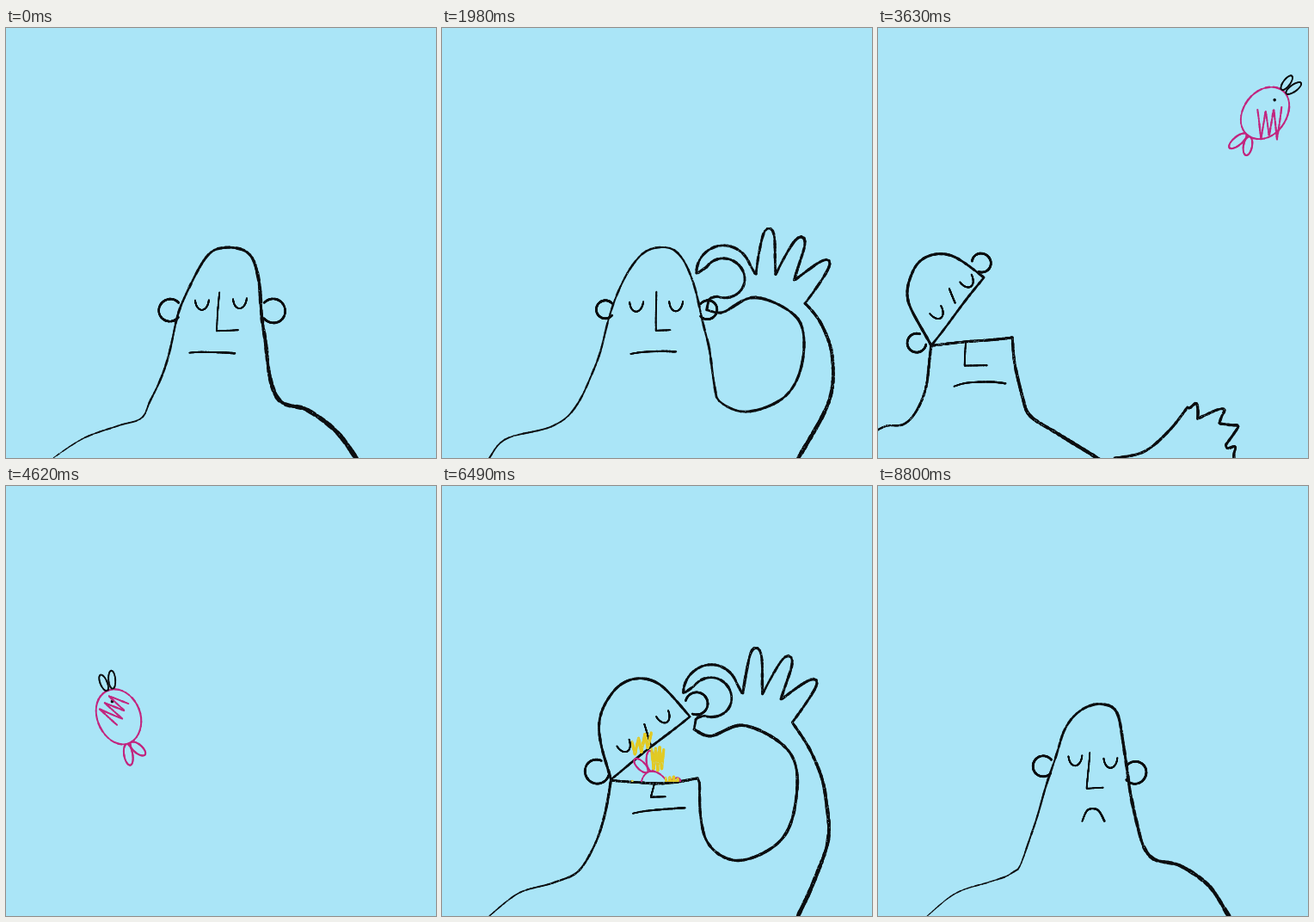
Write an HTML page with a canvas that moves like this. It is 500 px wide and 500 px high and loops after 8.91 s.

```html
<!DOCTYPE html>
<html lang="en">
<head>
<meta charset="utf-8">
<title>Bird in the head</title>
<style>
html, body { margin: 0; width: 100%; height: 100%; overflow: hidden; background: #aae5f7; }
canvas { display: block; width: 100vw; height: 100vh; }
</style>
</head>
<body>
<canvas id="stage" width="500" height="500"></canvas>
<script>
const ctx = document.getElementById('stage').getContext('2d');
const SKY = '#aae5f7', INK = '#0c0e10', PINK = '#c2267f', GOLD = '#e2ca24';
const STEP = 110, COUNT = 81, N = 150, RAD = Math.PI / 180;

const mix = (a, b, t) => a + (b - a) * t;
const ease = t => t * t * (3 - 2 * t);
const rnd = (i, seed) => { const v = Math.sin(i * 12.9898 + seed * 78.233) * 43758.5453; return v - Math.floor(v); };

// Geometry: every helper returns a list of [x, y]
const pairs = v => Array.from({ length: v.length / 2 }, (_, i) => [v[2 * i], v[2 * i + 1]]);
function spline(...v) {
  const p = pairs(v), out = [];
  for (let i = 0; i < p.length - 1; i++) {
    const a = p[Math.max(i - 1, 0)], b = p[i], c = p[i + 1], d = p[Math.min(i + 2, p.length - 1)];
    for (let t = 0; t < 1; t += .05)
      out.push([0, 1].map(k => b[k] + .5 * t * (c[k] - a[k] + t * (2 * a[k] - 5 * b[k] + 4 * c[k] - d[k] + t * (3 * (b[k] - c[k]) + d[k] - a[k])))));
  }
  return [...out, p[p.length - 1]];
}
// Elliptic arc in degrees, tilted about its centre
function arc(x, y, rx, ry, from, to, tilt = 0) {
  const n = Math.ceil(Math.abs(to - from) / 9), c = Math.cos(tilt * RAD), s = Math.sin(tilt * RAD);
  return Array.from({ length: n + 1 }, (_, i) => {
    const a = mix(from, to, i / n) * RAD, u = rx * Math.cos(a), v = ry * Math.sin(a);
    return [x + u * c - v * s, y + u * s + v * c];
  });
}
function leaf(x, y, length, angle, fat) {
  const r = length / 2;
  return arc(x + r * Math.cos(angle * RAD), y + r * Math.sin(angle * RAD), r, fat, -170, 170, angle);
}
// Evenly spaced points, so that any two strokes can be blended
function even(p, n = N) {
  const at = [0];
  for (let i = 1; i < p.length; i++) at.push(at[i - 1] + Math.hypot(p[i][0] - p[i - 1][0], p[i][1] - p[i - 1][1]));
  let k = 1;
  return Array.from({ length: n }, (_, i) => {
    const d = at[at.length - 1] * i / (n - 1);
    while (k < p.length - 1 && at[k] < d) k++;
    const t = (d - at[k - 1]) / (at[k] - at[k - 1] || 1);
    return [mix(p[k - 1][0], p[k][0], t), mix(p[k - 1][1], p[k][1], t)];
  });
}
const blend = (p, q, t) => p.map(([x, y], i) => [mix(x, q[i][0], t), mix(y, q[i][1], t)]);

// Face parts
const eye = ([x, y], tilt) => arc(x, y, 8, 13, 172, 6, tilt);
const ear = ([x, y, r], facing) => arc(x, y, r, r, -140, 140, facing);
const nose = ([x0, y0, x1, y1, tip]) => tip ? [[x0, y0], [x1, y1], [x1 + tip, y1 - 1]] : [[x0, y0], [x1, y1]];
const mouth = ([x0, y0, x1, y1, bend]) => spline(x0, y0, mix(x0, x1, .25), mix(y0, y1, .25) - bend, mix(x0, x1, .7), mix(y0, y1, .7) - bend, x1, y1);
const face = (tilt, ears, eyes, n, m) => ({
  earL: ear(ears[0], 180 + tilt), earR: ear(ears[1], tilt),
  eyeL: eye(eyes[0], tilt), eyeR: eye(eyes[1], tilt), nose: nose(n), mouth: mouth(m)
});
// Skull cap on the chord from hinge to tip
function dome(x0, y0, x1, y1, high) {
  const dx = x1 - x0, dy = y1 - y0, shape = [0, 0, .24, .49, .55, .66, .8, .63, .97, .42, 1, 0];
  const v = pairs(shape).flatMap(([u, h]) => [x0 + dx * u + dy * h * high, y0 + dy * u - dx * h * high]);
  return [...spline(...v), [x0, y0]];
}
// Fingers: tips between valleys
function fingers(valleys, tips, fat) {
  return tips.flatMap(([x, y], i) => {
    const [ax, ay] = valleys[i], [bx, by] = valleys[i + 1];
    const dx = x - (ax + bx) / 2, dy = y - (ay + by) / 2, d = Math.hypot(dx, dy), u = dx / d * fat, v = dy / d * fat;
    return spline(ax, ay, x - u * 1.5 + v, y - v * 1.5 - u, x, y, x - u * 1.5 - v, y - v * 1.5 + u, bx, by);
  });
}
const pinch = [
  [293, 283], [295, 270], ...arc(313, 246, 24, 23, 112, -145), ...arc(313, 240, 32, 32, 178, 340),
  ...fingers([[350, 242], [373, 242], [394, 249], [407, 275]], [[365, 188], [404, 198], [435, 225]], 7)
];
const loose = [...spline(275, 500, 310, 492, 340, 467, 360, 441),
  ...fingers([[360, 441], [372, 454], [397, 460], [404, 485], [414, 502]], [[370, 436], [403, 444], [419, 463], [415, 487]], 5)];

// Poses
const move = (p, dx, dy) => p.map(([x, y]) => [x + dx, y + dy]);
const lean = (p, dx, dy, tail) => p.map(([x, y], i) => {
  const k = tail ? 1 - i / (p.length - 1) : i / (p.length - 1);
  return [x + dx * k, y + dy * k];
});
const mapPose = (pose, f) => ({ w: pose.w, s: Object.fromEntries(Object.entries(pose.s).map(([k, p]) => [k, p.map(f)])) });
const shift = (pose, dx, dy) => mapPose(pose, ([x, y]) => [x + dx, y + dy]);
const stretch = (pose, k) => mapPose(pose, ([x, y]) => [x, y < 430 ? 430 + (y - 430) * k : y]);
const makePose = (w, strokes) => ({ w, s: Object.fromEntries(Object.entries(strokes).map(([k, p]) => [k, even(p)])) });

const calmHead = [55, 500, 92, 476, 130, 463, 157, 454, 167, 434, 185, 395, 203, 325, 232, 268, 255, 255, 282, 262, 293, 290, 300, 355, 314, 428];
const calmFace = face(0, [[191, 328, 13], [311, 329, 14]], [[228, 315], [272, 313]], [248, 307, 245, 352, 25], [213, 378, 266, 378, 1]);
const reachHead = [55, 500, 75, 478, 130, 462, 157, 438, 180, 388, 203, 310, 230, 266, 255, 255, 275, 262, 291, 293, 310, 370, 328, 416];
const reachFace = face(0, [[190, 327, 10.5], [309, 328, 11]], [[226, 317], [272, 316]], [249, 307, 249, 352, 17], [219, 379, 272, 376, 1]);
const armLoop = spline(299, 345, 306, 410, 340, 435, 385, 420, 408, 385, 412, 330, 395, 300, 350, 278, 313, 291, 293, 283);
const armOuter = spline(407, 275, 430, 310, 446, 360, 447, 420, 414, 500);
const torso = spline(55, 500, 90, 473, 130, 461, 158, 449, 176, 420, 190, 380, 196, 342);
const held = { hand: move(pinch, 15, 45), outer: lean(armOuter, 15, 45, true) };

const calm = makePose([1.3, 5], { ...calmFace, body: spline(...calmHead, 350, 444, 385, 470, 407, 500) });
const lift = makePose([1.5, 4], { ...calmFace, body: spline(...calmHead, 365, 453, 430, 476, 512, 505), outer: [[640, 600], [470, 520]] });
const reach = makePose([1.8, 3.2], {
  ...reachFace, body: spline(...reachHead, 360, 445, 420, 448, 470, 437, 506, 420),
  hand: move(pinch, 228, 140), outer: spline(640, 417, 530, 475, 505, 480, 455, 502)
});
const grab = makePose([1.8, 3.2], { ...reachFace, ...held, body: [...spline(...reachHead.slice(0, -2)), ...lean(armLoop, 15, 45).slice(28)] });
const shut = makePose([1.5, 3.2], {
  ...reachFace, ...held, left: torso, cut: [[196, 342], [300, 340]], right: lean(armLoop, 15, 45),
  lid: dome(196, 341, 300, 338, 1.25), nose: nose([249, 307, 249, 338]), nose2: nose([249, 343, 249, 352, 17])
});
const open = makePose([1.3, 3.4], {
  ...face(-26, [[180, 332, 14], [296, 253, 13]], [[210, 297], [255, 263]], [235, 277, 243, 301], [222, 381, 283, 374, 1]),
  left: torso, cut: spline(196, 342, 250, 346, 297, 340), right: [[297, 340], ...armLoop],
  lid: dome(196, 341, 288, 268, 1), nose2: nose([247, 345, 243, 362, 17]), hand: pinch, outer: armOuter
});
const wave = makePose([2, 4], {
  ...face(-32, [[45, 366, 11], [120, 273, 11]], [[66, 326], [101, 290]], [83, 303, 90, 320], [88, 417, 148, 413, 3]),
  left: spline(-5, 470, 10, 463, 30, 461, 45, 445, 56, 415, 62, 369), cut: [[62, 369], [156, 360]],
  right: spline(156, 360, 160, 395, 168, 430, 178, 452, 210, 472, 262, 505),
  lid: dome(62, 369, 123, 290, 1.06), nose2: nose([102, 366, 101, 393, 26]), hand: loose, outer: [[414, 502], [410, 540]]
});
const slump = makePose([1.5, 4.6], {
  ...face(-14, [[175, 340, 11], [302, 321, 13]], [[204, 319], [253, 307]], [228, 310, 240, 356, 17], [223, 388, 266, 387, 0]),
  body: spline(67, 500, 88, 464, 115, 440, 150, 412, 165, 398, 181, 360, 183, 292, 200, 260, 227, 245, 255, 258, 278, 288, 291, 330, 294, 375, 312, 418, 340, 452, 358, 466, 389, 500)
});
const sad = makePose([1.2, 4.4], {
  ...face(0, [[192, 326, 12], [299, 333, 13]], [[229, 312], [270, 315]], [246, 310, 243, 352, 19], [237, 390, 263, 390, 13]),
  body: spline(57, 500, 90, 474, 130, 460, 155, 450, 170, 430, 205, 319, 219, 280, 237, 260, 260, 254, 279, 266, 288, 320, 300, 389, 317, 431, 352, 442, 385, 465, 408, 500)
});

const acts = [
  [0, calm], [5, calm], [8, lift], [11, reach], [18, grab], [19, shut], [25, open], [27, open], [33, wave],
  [36, shift(wave, -440, 40)], [37, makePose([1, 1], {})], [55, open], [59, open], [61, shut], [62, grab],
  [63, calm], [66, stretch(calm, 1.36)], [68, slump], [72, calm], [75, stretch(calm, 1.52)], [78, sad], [81, sad]
];
function poseAt(n) {
  const i = acts.findIndex((a, k) => acts[k + 1][0] > n);
  const [n0, a] = acts[i], [n1, b] = acts[i + 1], t = ease((n - n0) / (n1 - n0)), s = {};
  for (const k in a.s) s[k] = b.s[k] ? blend(a.s[k], b.s[k], t) : a.s[k];
  return { w: a.w.map((v, k) => mix(v, b.w[k], t)), s };
}

// Crayon line with a slight boil per drawing
let now = 0;
function stroke(p, color, w0, w1 = w0) {
  const last = p.length - 1;
  const q = p.map(([x, y]) => [x + .35 * Math.sin(y * .09 + now), y + .35 * Math.sin(x * .08 + now * 2)]);
  ctx.strokeStyle = color;
  ctx.lineCap = ctx.lineJoin = 'round';
  for (let i = 0; i < last; i++) {
    ctx.lineWidth = mix(w0, w1, i / last) * (.8 + .4 * rnd(i, now));
    ctx.beginPath();
    ctx.moveTo(...q[i]);
    ctx.lineTo(...q[i + 1]);
    ctx.stroke();
  }
  ctx.fillStyle = SKY;
  if (w1 > 2.6) q.forEach(([x, y], i) => {
    const r = w1 * (rnd(i, now + 9) - .5);
    if (rnd(i, now + 5) < .2) ctx.fillRect(x + r, y + r, .8, .8);
  });
}
function scribble(x0, y0, x1, y1, h, turns, color, w) {
  const p = Array.from({ length: turns + 1 }, (_, i) => [
    mix(x0, x1, i / turns), mix(y0, y1, i / turns) + (i % 2 ? h : -h) / 2 * (.75 + .35 * rnd(i, now))
  ]);
  stroke(even(p, 60), color, w);
}

function drawMan(n) {
  const { w, s } = poseAt(n);
  const widths = { body: w, left: [w[0], 3], cut: [2.6, 2.8], right: [3, w[1]], lid: [3.1, 2.4], hand: [2.9, 2.9], outer: [3, 4.4], earL: [2.4, 2.4], earR: [2.4, 2.4], mouth: [1.7, 2.2] };
  for (const k in s) stroke(s[k], INK, ...(widths[k] || [1.7, 1.7]));
}

// Bird drawn heading along +x; wing is the root of two leaf wings, if any
function drawBird(x, y, heading, size, fat, wing) {
  const w = 2 / Math.sqrt(size);
  ctx.save();
  ctx.translate(x, y);
  ctx.rotate(heading * RAD);
  ctx.scale(size, size);
  stroke(arc(0, 0, 33, fat, 0, 360), PINK, w);
  stroke(leaf(-33, -2, 25, 190, 5), PINK, w);
  stroke(leaf(-33, 3, 22, 150, 5), PINK, w);
  if (wing) [-122, -88].forEach((a, i) => stroke(leaf(wing[0] + i * 5, wing[1], 32 + i * 6, a, 7), PINK, w));
  stroke(leaf(33, -2, 20, -4, 4), INK, w * .85);
  stroke(leaf(33, 5, 21, 14, 4), INK, w * .85);
  ctx.fillStyle = INK;
  ctx.beginPath();
  ctx.arc(19, -1, 1.8 / Math.sqrt(size), 0, 7);
  ctx.fill();
  ctx.restore();
}
function drawFlyer(x, y, heading, n) {
  const flap = n % 2 ? 1 : -.8;
  drawBird(x, y, heading, 1, 25);
  ctx.save();
  ctx.translate(x, y);
  ctx.rotate((heading + 51) * RAD);
  scribble(-9, 13 * flap, 19, 11 * flap, 36 * flap, 6, PINK, 2);
  ctx.restore();
}
function drawBurning(x, y, heading) {
  drawBird(x, y, heading, .95, 19, [2, -5]);
  ctx.save();
  ctx.translate(x, y);
  for (const [dx, dy, wide, h, slope] of [[-29, -57, 22, 20, -9], [-6, -45, 14, 28, 2], [10, -14, 14, 22, 2], [-29, -9, 20, 26, 20]])
    scribble(dx, dy, dx + wide, dy + slope, h, 6, GOLD, 3.2);
  ctx.restore();
}
function inSkull(draw) {
  ctx.save();
  ctx.beginPath();
  ctx.rect(0, -50, 500, 394);
  ctx.clip();
  draw();
  ctx.restore();
}

function drawSun(dy) {
  ctx.save();
  ctx.translate(0, dy);
  [[28, 27], [25, 26], [23, 22], [17, 16], [14, 17], [8, 12], [5, 8]].forEach(([rx, ry], i) =>
    stroke(arc(249 + rnd(i, 3) * 2 - 1, 105 + rnd(i, 4) * 2 - 1, rx, ry, 0, 360, 20), GOLD, i < 3 ? 4.4 : 2.6));
  [-109, -51, -8, 38, 110, 143, 190].forEach((a, i) => {
    const r = 45 + (i === 4 || i === 5 ? 7 : 0);
    stroke(leaf(249 + r * Math.cos(a * RAD), 106 + r * Math.sin(a * RAD), 15, a + 8, 2.4), GOLD, 2.4);
  });
  ctx.restore();
}

function drawFlight(n) {
  if (n <= 36) {
    const t = ease(Math.min(1, (n - 26) / 7));
    drawFlyer(mix(290, 450, t), mix(215, 99, t) + (n > 33 ? 4 * Math.sin(n) : 0), -51, n);
  } else if (n <= 45) {
    const k = (n - 36) / 9, a = -40 + 300 * k, r = 228 - 180 * k * k;
    drawFlyer(270 + r * Math.cos(a * RAD), 225 + r * .85 * Math.sin(a * RAD), a + 90, n);
  } else drawFlyer(262 + 5 * (n - 45), 200, -80, n);
}

function draw(n) {
  now = n;
  ctx.fillStyle = SKY;
  ctx.fillRect(0, 0, 500, 500);
  drawMan(n);
  if (n >= 22 && n <= 26) inSkull(() => drawBird(279, 328 + (25 - n) * 11, -51, .55, 28, [-25, -12]));
  if (n >= 27 && n <= 48) drawFlight(n);
  if (n >= 46 && n <= 54) drawSun(n > 50 ? -11 * (n - 50) ** 2 : 0);
  if (n >= 49 && n <= 54) {
    const k = n - 50;
    drawBurning(280 + k, 217 + 24 * k + 4.5 * k * k, 65 + 5 * k);
  }
  if (n >= 56 && n <= 59) inSkull(() => drawBurning(250, 17 + 115 * (n - 56), 75));
}

let shown = -1;
function tick() {
  const n = Math.floor(performance.now() / STEP) % COUNT;
  if (n !== shown) draw(shown = n);
  requestAnimationFrame(tick);
}
tick();
</script>
</body>
</html>
```
